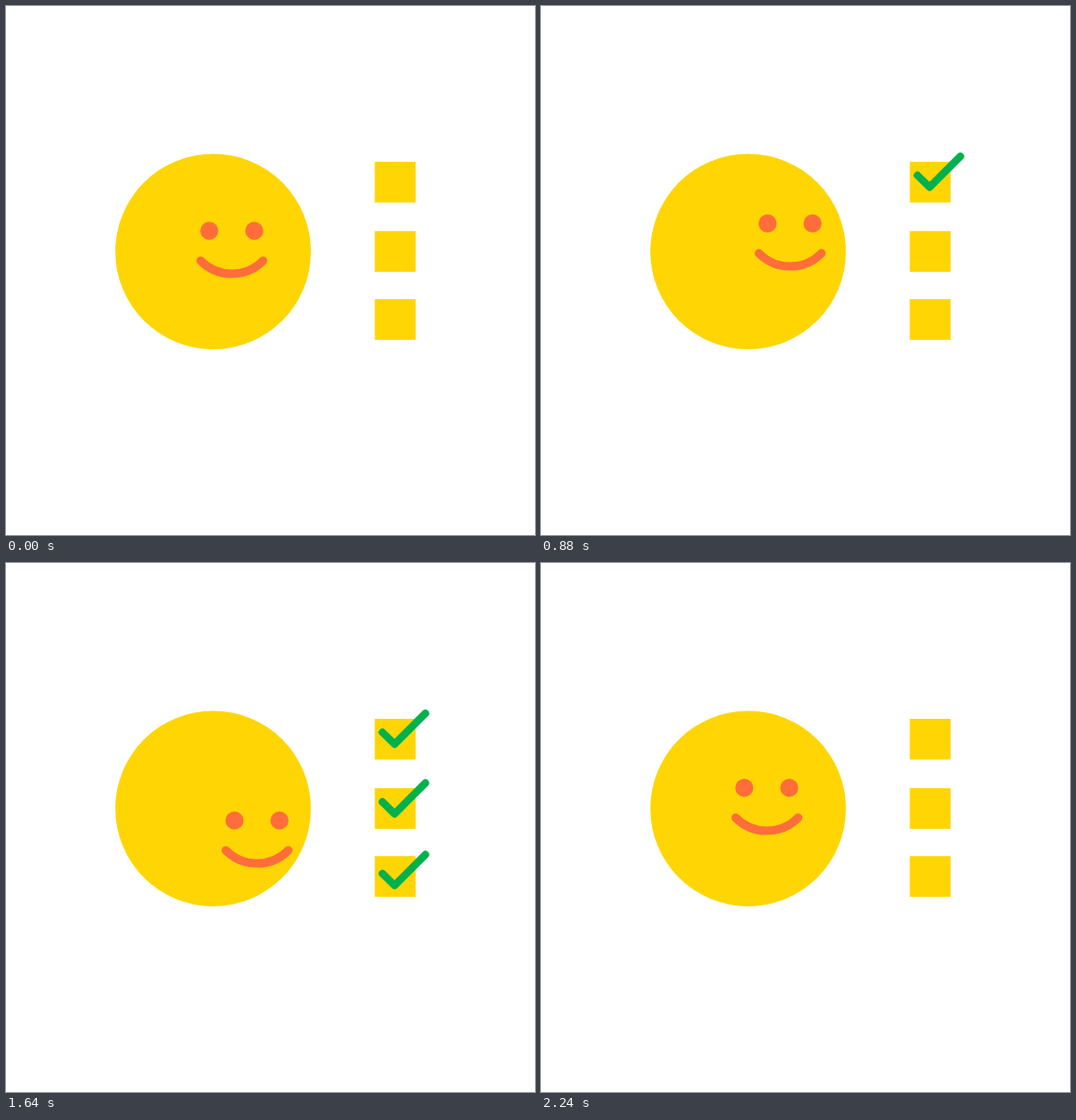
An HTML page that plays this animation: 567x567 px, repeating every 2.42 s.

```html
<!DOCTYPE html>
<html lang="en">
<head>
<meta charset="utf-8">
<title>Checklist smile</title>
<style>
  html, body { margin: 0; width: 100%; height: 100%; overflow: hidden; background: #fff; }
  svg { display: block; width: 100vw; height: 100vh; }
  .sun { fill: #ffd504; }
  .eye { fill: #ff6d3a; }
  .mouth, .check { fill: none; stroke-linecap: round; stroke-linejoin: round; }
  .mouth { stroke: #ff6d3a; stroke-width: 9; }
  .check { stroke: #00b14c; stroke-width: 8; }
</style>
</head>
<body>
<svg viewBox="0 0 567 567">
  <circle class="sun" cx="222" cy="263.2" r="104.8"/>
  <g class="sun">
    <rect x="395.3" y="167" width="43.7" height="43.6"/>
    <rect x="395.3" y="241.3" width="43.7" height="43.6"/>
    <rect x="395.3" y="314.2" width="43.7" height="43.6"/>
  </g>
  <!-- Face origin is the left eye -->
  <g id="face">
    <circle class="eye" r="9.7"/>
    <circle class="eye" cx="48.2" r="9.7"/>
    <path class="mouth" d="M-9.3 32A47 47 0 0 0 57.7 32"/>
  </g>
  <g id="checks"></g>
</svg>
<script>
const LOOP = 2420, STEP = 20;

// Each move: start, duration, destination
const home = [217.9, 241];
const moves = [
  [0, 280, [232.9, 204]],
  [700, 280, [247, 245]],
  [1220, 280, [244.9, 276]],
  [1780, 304, home]
];

// Each check: vertical offset, draw start, draw end
const checks = [[0, 320, 460], [74.6, 880, 1000], [151.4, 1520, 1640]];
const ERASE = [2100, 2240];

const face = document.getElementById('face');
const group = document.getElementById('checks');
const marks = checks.map(([dy]) => {
  const path = document.createElementNS('http://www.w3.org/2000/svg', 'path');
  path.setAttribute('class', 'check');
  path.setAttribute('d', 'M403.5 181.5L416.5 194.2L449.5 161.2');
  path.setAttribute('pathLength', 1);
  path.setAttribute('transform', `translate(0 ${dy})`);
  return group.appendChild(path);
});

const progress = (t, from, to) => Math.min(1, Math.max(0, (t - from) / (to - from)));
const smooth = p => p * p * (3 - 2 * p);

function facePosition(t) {
  let [x, y] = home;
  for (const [start, duration, [tx, ty]] of moves) {
    const p = smooth(progress(t, start, start + duration));
    x += (tx - x) * p;
    y += (ty - y) * p;
  }
  return [x, y];
}

function render(t) {
  face.setAttribute('transform', `translate(${facePosition(t)})`);
  const kept = 1 - progress(t, ...ERASE);
  marks.forEach((mark, i) => {
    const [, from, to] = checks[i];
    const shown = Math.min(progress(t, from, to), kept);
    mark.style.visibility = shown > 0 ? 'visible' : 'hidden';
    mark.style.strokeDasharray = shown < 1 ? `${shown} 2` : 'none';
  });
}

const origin = performance.now();
function tick() {
  const t = (performance.now() - origin) % LOOP;
  render(Math.floor(t / STEP) * STEP);
  requestAnimationFrame(tick);
}
tick();
</script>
</body>
</html>
```
